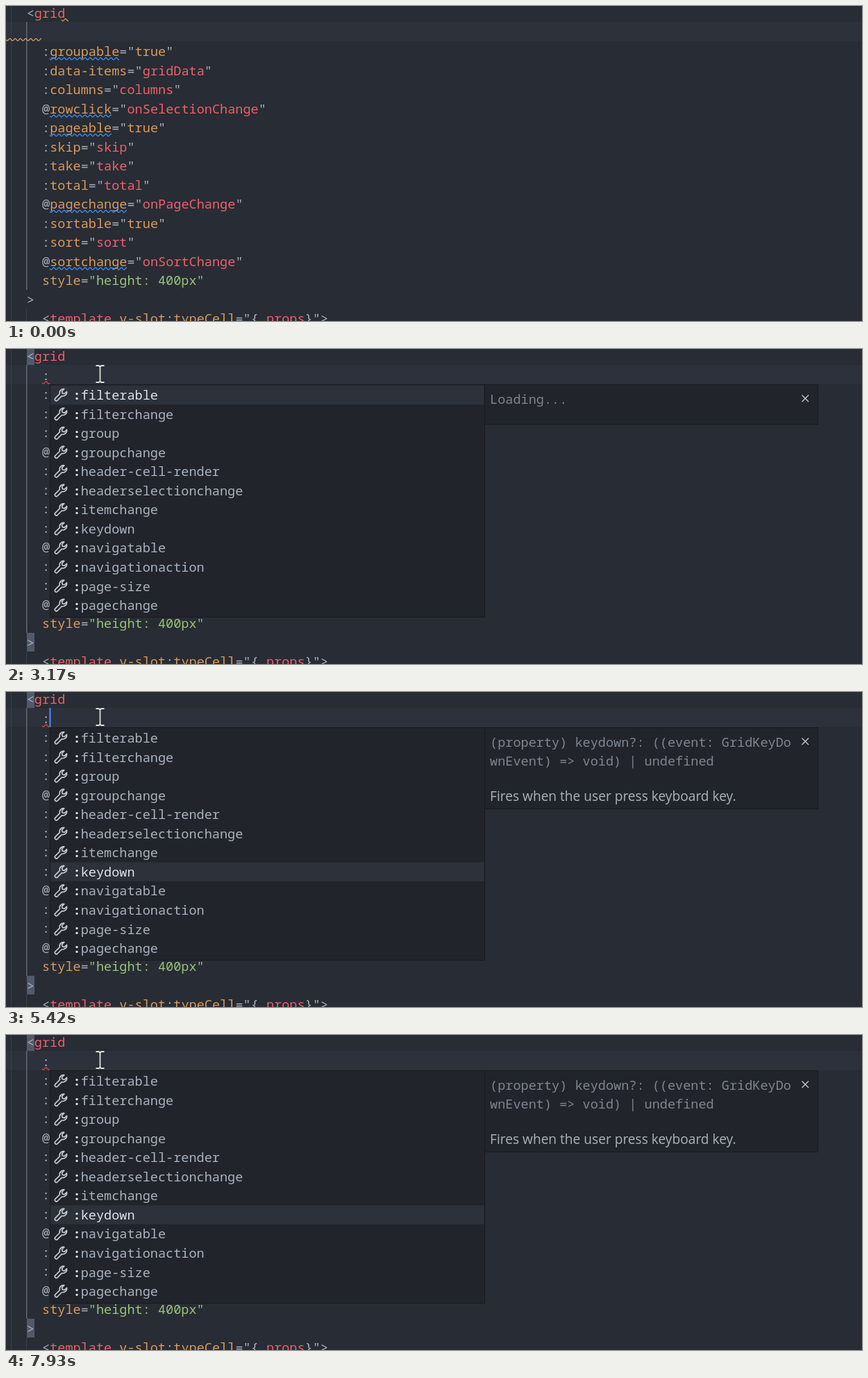
These frames come from a looping animation (1233 px wide and 454 px high, 8000 ms). An HTML page with a canvas:

```html
<!DOCTYPE html>
<html lang="en">
<head>
<meta charset="utf-8">
<title>Editor autocomplete</title>
<style>
  html, body { margin: 0; width: 100%; height: 100%; overflow: hidden; background: #282c34; }
  canvas { display: block; }
</style>
</head>
<body>
<canvas id="stage" width="1233" height="454"></canvas>
<script>
const ctx = document.getElementById('stage').getContext('2d');
const LOOP = 8000, ROW = 27.5, CHAR = 11.136, INDENT = 52;
const MONO = '18.56px "Noto Sans Mono", monospace';
const SANS = '19.15px "Open Sans", sans-serif';
const C = {
  bg: '#282c34', line: '#2c313c', text: '#abb2bf', red: '#ec606c', orange: '#d99a5c',
  green: '#98c379', blue: '#3794ff', popup: '#21252b', border: '#181a1f',
  bright: '#dfe2e8', dim: '#7f8590', caret: '#528bff'
};

// A leading ~ marks a name with a hint underline.
const attributes = [
  '~:groupable true', ':data-items gridData', ':columns columns',
  '~@rowclick onSelectionChange', '~:pageable true', ':skip skip', ':take take',
  ':total total', '~@pagechange onPageChange', ':sortable true', ':sort sort',
  '~@sortchange onSortChange'
];

const handler = (name, type) => `${name}?: ((event: Grid${type}Event) => void) | undefined`;
const items = [
  ['filterable', 'filterable?: boolean | undefined',
    'Enables filtering for the columns of the Grid\n([more information and examples]({% slug\nfiltering_grid_native %})).'],
  ['filterchange', handler('filterchange', 'FilterChange'),
    'Fires when the Grid filter is modified through the UI\n([more information and examples]({% slug\nfiltering_grid_native %})). You have to handle the\nevent yourself and filter the data.'],
  ['group', 'group?: GroupDescriptor[] | undefined',
    'The descriptors by which the data will be grouped\n([more information and examples]({% slug\ngrouping_grid_native %})).'],
  ['groupchange', handler('groupchange', 'GroupChange'),
    'Fires when the grouping of the Grid is changed. You\nhave to handle the event yourself and group the\ndata ([more information and examples]({% slug\ngrouping_grid_native %})).'],
  ['header-cell-render', 'headerCellRender?: string | boolean | object | undefined',
    'Fires when a header cell of the Grid is about to be\nrendered. Used to override the default appearance\nof the cell.'],
  ['headerselectionchange', handler('headerselectionchange', 'HeaderSelectionChange'),
    'Fires when the user clicks the checkbox of a column\nheader whose `field` matches `selectedField`.\n([see example]({% slug selection_grid_native %})).'],
  ['itemchange', handler('itemchange', 'ItemChange'),
    'Fires when the user changes the value of an item.\nThe event contains the `field` that was edited.\nYou have to handle the event yourself and update\nthe data ([more information and examples]({% slug\nediting_grid_native %})).'],
  ['keydown', handler('keydown', 'KeyDown'), 'Fires when the user press keyboard key.'],
  ['navigatable', 'navigatable?: boolean | undefined',
    'If set to `true`, the user can use dedicated\nshortcuts to interact with the Grid. By default,\nnavigation is disabled.'],
  ['navigationaction', handler('navigationaction', 'NavigationAction'),
    'Fires when Grid keyboard navigation position is\nchanged.'],
  ['page-size', 'pageSize?: number | undefined',
    'Defines the page size that is used by the Grid pager\n([see example]({% slug paging_grid_native %})).\nRequired by the paging functionality.'],
  ['pagechange', handler('pagechange', 'PageChange'),
    'Fires when the page of the Grid is changed ([see\nexample]({% slug paging_grid_native %})). You have\nto handle the event yourself and page the data.']
];

const CLICK = 1550, TYPED = 2550, CHECKED = 2750, POPUP = 2900, DETAILS = 3170, LOADED = 3440;
const selections = [[0, 0], [3920, 1], [4270, 2], [4480, 3], [4750, 4], [4950, 5], [5170, 6],
  [5420, 7], [5620, 8], [5960, 9], [6300, 10], [6560, 11], [6940, 10], [7270, 9], [7470, 8], [7800, 7]];

const wrench = new Path2D('M14.8 1.6A5.6 5.6 0 0 0 8.4 8.6L1.9 15.1A2.2 2.2 0 0 0 5 18.2' +
  'L11.5 11.7A5.6 5.6 0 0 0 18.5 5.3L15.2 8.5L12.3 7.8L11.5 4.9Z');

function rect(x, y, w, h, color) {
  ctx.fillStyle = color;
  ctx.fillRect(x, y, w, h);
}

function text(str, x, y, color, font = MONO) {
  ctx.font = font;
  ctx.fillStyle = color;
  ctx.fillText(str, x, y);
  return x + ctx.measureText(str).width;
}

function code(x, row, ...parts) {
  for (let i = 0; i < parts.length; i += 2) {
    text(parts[i], x, 17 + row * ROW, parts[i + 1]);
    x += parts[i].length * CHAR;
  }
}

function stroke(color, width, path) {
  ctx.strokeStyle = color;
  ctx.lineWidth = width;
  ctx.stroke(path);
}

function squiggle(x1, x2, y, color) {
  const path = new Path2D();
  for (let x = x1; x <= x2; x += 0.5) path.lineTo(x, y + 1.5 * Math.sin((x - x1) * 2 * Math.PI / 7.5));
  stroke(color, 1.3, path);
}

function frame(x, y, w, h) {
  rect(x, y, w, h, C.popup);
  ctx.strokeStyle = C.border;
  ctx.lineWidth = 1;
  ctx.strokeRect(x + 0.5, y + 0.5, w - 1, h - 1);
}

function drawEditor(t) {
  rect(0, 0, 1233, 454, C.bg);
  rect(0, 23, 1233, 27.5, C.line);
  rect(7, 0, 1, 454, '#3b4048');
  rect(29, 23, 1.5, 386, '#626873');
  rect(29, 436, 1, 18, '#3b4048');
  if (t >= CLICK) {
    rect(30, 0, 11, 23, '#515a6b');
    rect(30, 409, 11, 27, '#515a6b');
  }
  code(29.7, 0, '<', C.text, 'grid', C.red);
  attributes.forEach((entry, i) => {
    const [key, value] = entry.replace('~', '').split(' ');
    const name = key.slice(1), literal = value === 'true';
    code(INDENT, i + 2, key[0], C.text, name, C.orange, '="', C.text,
      value, literal ? C.orange : C.red, '"', C.text);
    if (entry[0] === '~') {
      squiggle(INDENT + CHAR, INDENT + CHAR * (1 + name.length), 76 + i * ROW, C.blue);
    }
  });
  code(INDENT, 14, 'style', C.orange, '=', C.text, '"height: 400px"', C.green);
  code(29.7, 15, '>', C.text);
  code(INDENT, 16, '<', C.text, 'template', C.red, ' v-slot', C.orange, ':', C.text,
    'typeCell', C.orange, '="{ ', C.text, 'props', C.red, '}">', C.text);

  if (t >= TYPED) code(INDENT, 1, ':', C.text);
  if (t < CHECKED) {
    squiggle(0, 51, 48.5, '#d9a25c');
    squiggle(80, 90, 20, '#d9a25c');
  } else {
    squiggle(52, 63, 48.5, '#e0453f');
  }
}

function drawCaret(t) {
  const shown = t < TYPED
    ? (t >= CLICK && t < 2020) || t >= 2420
    : t < 2965 || (t - 2965) % 992 >= 470;
  if (shown) rect(t < TYPED ? 51 : 62.5, 23, 2, 27.5, C.caret);
}

function drawList(selected) {
  frame(63, 51, 627, 336);
  items.forEach(([name], i) => {
    const y = 52.5 + i * 27.55, active = i === selected;
    if (active) rect(64, y, 624.5, 27.5, '#2c313a');
    ctx.save();
    ctx.translate(69, y + 3.5);
    ctx.lineJoin = 'round';
    stroke('#c5c8ce', 1.7, wrench);
    ctx.restore();
    text(':', 96.5, y + 20.5, C.bright, 'bold ' + MONO);
    text(name, 96.5 + CHAR, y + 20.5, active ? C.bright : C.text);
  });
}

function wrap(str, width = 39) {
  const lines = [];
  for (let rest = str; rest; rest = rest.slice(width).trimStart()) lines.push(rest.slice(0, width));
  return lines;
}

// Odd pieces between backticks are inline code chips.
function docLine(line, y) {
  let x = 697;
  line.split('`').forEach((piece, i) => {
    if (i % 2 === 0) {
      x = text(piece, x, y, C.text, SANS);
      return;
    }
    const w = piece.length * CHAR + 16;
    ctx.fillStyle = '#1b1e23';
    ctx.beginPath();
    ctx.roundRect(x, y - 19, w, 25, 4);
    ctx.fill();
    text(piece, x + 8, y, C.text);
    x += w;
  });
}

function drawDetails(t, selected) {
  const loading = t < LOADED;
  const head = loading ? ['Loading...'] : wrap('(property) ' + items[selected][1]);
  const docs = loading ? [] : items[selected][2].split('\n');
  const scrolling = selected === 1;
  const chips = docs.some(line => line.includes('`')) ? 2 : 0;
  const bottom = loading ? 109 : 115 + (head.length + docs.length) * 27 + chips - 27;

  frame(689, 51, 481, bottom - 51);
  if (scrolling) rect(1153, 52, 16, bottom - 53, '#343943');
  ctx.save();
  ctx.beginPath();
  ctx.rect(690, 52, scrolling ? 467 : 479, 400);
  ctx.clip();
  head.forEach((line, i) => text(line, 697, 79 + i * 27, C.dim));
  let y = 130 + (head.length - 1) * 27;
  for (const line of docs) {
    docLine(line, y);
    y += line.includes('`') ? 29 : 27;
  }
  ctx.restore();
  stroke('#c5c8ce', 1.4, new Path2D('M1146.5 66.5L1156 76M1156 66.5L1146.5 76'));
}

function pointer(t) {
  const time = 190 + Math.floor((t - 190) / 70) * 70;
  const ease = (start, length) => {
    const k = Math.min(1, Math.max(0, (time - start) / length));
    return k * k * (3 - 2 * k);
  };
  const far = ease(120, 820), near = ease(940, 540);
  return [1097 - 842 * far - 119.5 * near, 437 - 394 * far - 7 * near];
}

function drawPointer(t) {
  if (t < 190) return;
  const [x, y] = pointer(t);
  ctx.save();
  ctx.translate(x, y);
  const beam = new Path2D('M-6 -12H-2.5Q0 -12 0 -9.5V9.5Q0 12 -2.5 12H-6M6 -12H2.5Q0 -12 0 -9.5M0 9.5Q0 12 2.5 12H6');
  stroke('#25282e', 3.2, beam);
  stroke('#e4e4dc', 1.8, beam);
  ctx.restore();
}

function render(now) {
  const t = now % LOOP;
  const selected = selections.findLast(([start]) => t >= start)[1];
  drawEditor(t);
  if (t >= POPUP) drawList(selected);
  if (t >= DETAILS) drawDetails(t, selected);
  drawCaret(t);
  drawPointer(t);
  requestAnimationFrame(render);
}
requestAnimationFrame(render);
</script>
</body>
</html>
```
